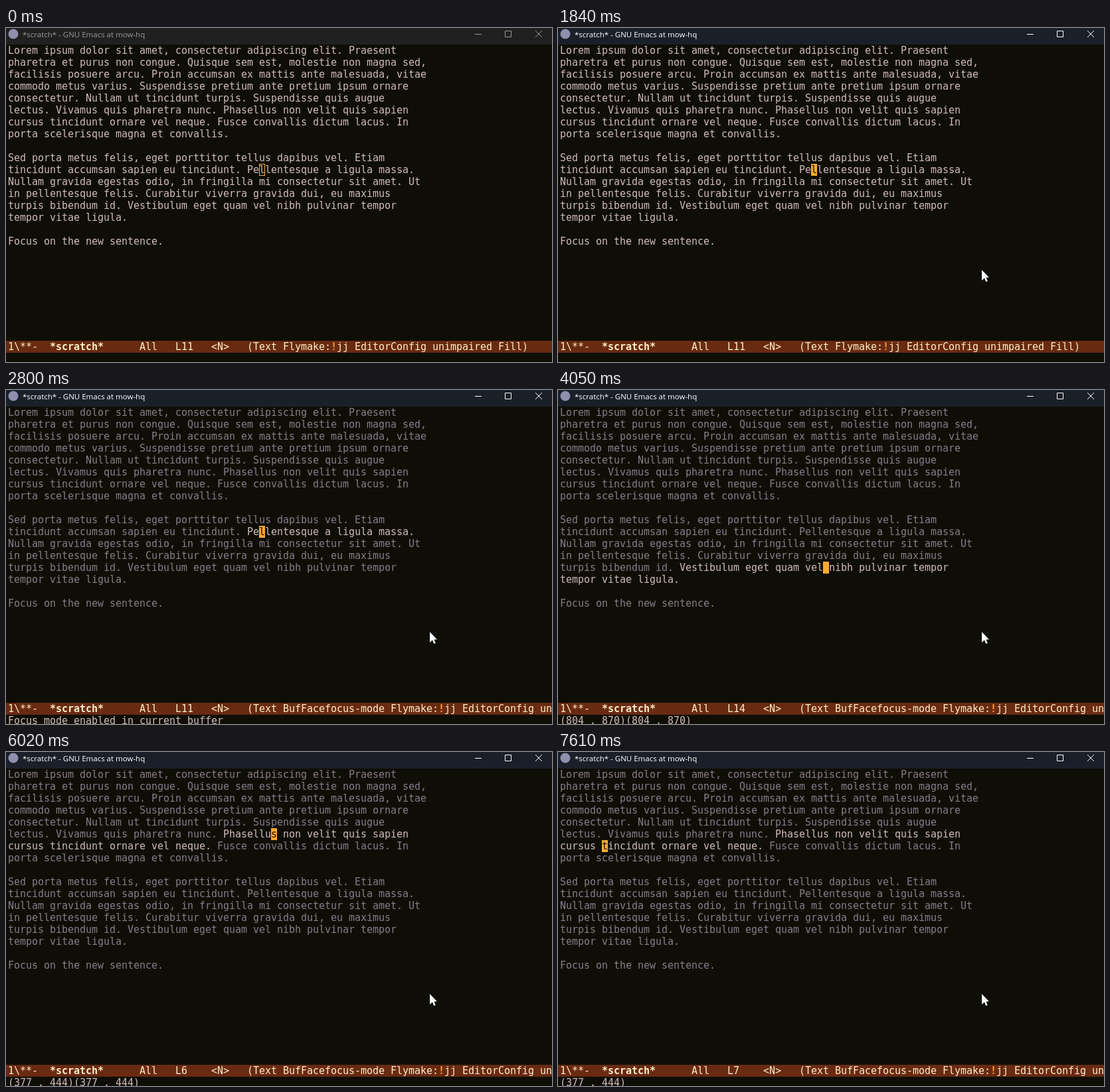
Animation of 822 by 504 pixels, one loop 8000 ms. Source, as an HTML page with a canvas:

```html
<!DOCTYPE html>
<html lang="la">
<head>
<meta charset="utf-8">
<title>Focus mode</title>
<style>
  html, body { margin: 0; width: 822px; height: 504px; overflow: hidden; background: #0f0e06; }
  canvas { display: block; }
</style>
</head>
<body>
<canvas id="stage" width="822" height="504"></canvas>
<script>
const ctx = document.getElementById("stage").getContext("2d");
const LOOP = 8000, CELL = 9, LINE = 18, LEFT = 3, TOP = 25, BAR = 472, ECHO = 490;
const BG = "#0f0e06", FG = "#cfbcba", DIM = "#887c8a", CURSOR = "#ffaa33";
const MODE_BG = "#692a12", MODE_FG = "#feeeca", WARN = "#ff9f3a";
const MONO = '15px "DejaVu Sans Mono", monospace';
const HOST = "mow-hq";

const text = `Lorem ipsum dolor sit amet, consectetur adipiscing elit. Praesent
pharetra et purus non congue. Quisque sem est, molestie non magna sed,
facilisis posuere arcu. Proin accumsan ex mattis ante malesuada, vitae
commodo metus varius. Suspendisse pretium ante pretium ipsum ornare
consectetur. Nullam ut tincidunt turpis. Suspendisse quis augue
lectus. Vivamus quis pharetra nunc. Phasellus non velit quis sapien
cursus tincidunt ornare vel neque. Fusce convallis dictum lacus. In
porta scelerisque magna et convallis.

Sed porta metus felis, eget porttitor tellus dapibus vel. Etiam
tincidunt accumsan sapien eu tincidunt. Pellentesque a ligula massa.
Nullam gravida egestas odio, in fringilla mi consectetur sit amet. Ut
in pellentesque felis. Curabitur viverra gravida dui, eu maximus
turpis bibendum id. Vestibulum eget quam vel nibh pulvinar tempor
tempor vitae ligula.

Focus on the new sentence.`;

const lines = text.split("\n");
const starts = [];
lines.reduce((at, line) => (starts.push(at), at + line.length + 1), 0);
const sentences = [...text.matchAll(/\S[^.]*\.(\s(?!\n))?/g)]
  .map(m => [m.index, m.index + m[0].length]);

// Times of the main events, in ms
const ENTER = 160, FOCUS = 840, REST = 1110, PROMPT = 2240, RUN = 2730, FOCUS_MODE = 2800;

// [time, row, column, end of paragraph]
const moves = [
  [0, 10, 42], [3200, 10, 43], [3360, 10, 44], [3590, 11, 44], [3850, 12, 44],
  [4050, 13, 44], [4680, 12, 44], [4810, 11, 44], [5140, 10, 44], [5310, 9, 44],
  [5510, 8, 0], [5680, 7, 36, true], [5850, 6, 44], [6020, 5, 44], [6220, 4, 44],
  [6360, 3, 44], [6560, 3, 0], [6660, 4, 0], [7150, 5, 0], [7310, 6, 0], [7610, 6, 7]
];
const blinks = [[1340, 1840], [4550, 4680]];

const within = (t, a, b) => t >= a && t < b;
const clamp = v => Math.max(0, Math.min(1, v));

function rect(x, y, w, h, color) {
  ctx.fillStyle = color;
  ctx.fillRect(x, y, w, h);
}

// Writes on the character grid; y is the top of the row
function write(s, col, y, color, bold) {
  ctx.font = (bold ? "bold " : "") + MONO;
  ctx.fillStyle = color;
  [...s].forEach((ch, i) => {
    if (ch !== " ") ctx.fillText(ch, LEFT + (col + i) * CELL, y + 14);
  });
}

function titleBar(title, bg, fg) {
  rect(0, 0, 822, TOP, bg);
  ctx.fillStyle = "#8f8fae";
  ctx.beginPath();
  ctx.arc(11, 9, 7.5, 0, 7);
  ctx.fill();
  ctx.font = '11.5px "Open Sans", sans-serif';
  ctx.fillStyle = ctx.strokeStyle = fg;
  ctx.fillText(`${title} - GNU Emacs at ${HOST}`, 25, 14);
  ctx.lineWidth = 1;
  ctx.beginPath();
  ctx.moveTo(706, 9.5);
  ctx.lineTo(716, 9.5);
  ctx.rect(751.5, 4.5, 9, 9);
  ctx.moveTo(797, 4);
  ctx.lineTo(807, 14);
  ctx.moveTo(807, 4);
  ctx.lineTo(797, 14);
  ctx.stroke();
}

function modeLine(row, focused) {
  rect(0, BAR, 822, LINE, MODE_BG);
  const modes = "(Text " + (focused ? "BufFacefocus-mode " : "") + "Flymake:";
  const end = 40 + modes.length;
  write("1\\**-", 0, BAR, MODE_FG);
  write("*scratch*", 7, BAR, MODE_FG, true);
  write("All   " + ("L" + (row + 1)).padEnd(6) + "<N>", 22, BAR, MODE_FG);
  write(modes, 40, BAR, MODE_FG);
  write("!", end, BAR, WARN, true);
  write("jj EditorConfig unimpaired Fill)", end + 1, BAR, MODE_FG);
}

function pointer(t) {
  const left = (1 - clamp((t - ENTER) / (REST - ENTER))) ** 3;
  const x = 638 + 158 * left, y = 365 + 107 * left;
  const shape = [[0, 0], [0, 16], [4, 12.5], [6.3, 18], [8.8, 17], [6.5, 11.6], [11, 11.6]];
  ctx.beginPath();
  shape.forEach(([dx, dy]) => ctx.lineTo(x + dx, y + dy));
  ctx.closePath();
  ctx.strokeStyle = "#000";
  ctx.lineWidth = 1;
  ctx.stroke();
  ctx.fillStyle = "#fff";
  ctx.fill();
}

function draw(t) {
  const [, row, col, paragraphEnd] = moves.findLast(m => m[0] <= t);
  const at = starts[row] + col;
  const [from, to] = paragraphEnd ? [513, 515] : sentences.find(s => s[1] > at);
  const focused = t >= FOCUS_MODE, prompting = within(t, PROMPT, RUN);

  rect(0, 0, 822, 504, BG);
  titleBar("*scratch*", "#202020", "#999");
  ctx.globalAlpha = clamp((t - FOCUS) / 160);
  titleBar(prompting ? "*Minibuf-1*" : "*scratch*", "#1a202a", "#fff");
  ctx.globalAlpha = 1;

  lines.forEach((line, r) => {
    const y = TOP + r * LINE;
    if (!focused) return write(line, 0, y, FG);
    const a = Math.max(0, Math.min(line.length, from - starts[r]));
    const b = Math.max(0, Math.min(line.length, to - starts[r]));
    write(line.slice(0, a), 0, y, DIM);
    write(line.slice(a, b), a, y, FG);
    write(line.slice(b), b, y, DIM);
  });

  const x = LEFT + col * CELL, y = TOP + row * LINE;
  if (t < FOCUS || prompting) {
    ctx.strokeStyle = CURSOR;
    ctx.lineWidth = 1;
    ctx.strokeRect(x + 0.5, y + 0.5, CELL - 1, LINE - 1);
  } else if (!blinks.some(b => within(t, ...b))) {
    rect(x, y, CELL, LINE, CURSOR);
    write(lines[row][col] || " ", col, y, BG);
  }

  modeLine(row, focused);
  if (prompting) {
    write("M-x ", 0, ECHO, FG);
    rect(LEFT + 4 * CELL, ECHO, CELL, LINE, CURSOR);
  } else if (t >= 3200) {
    const bounds = `(${from + 1} . ${to + 1})`;
    write(within(t, 3360, 7610) ? bounds + bounds : bounds, 0, ECHO, FG);
  } else if (focused) {
    write("Focus mode enabled in current buffer", 0, ECHO, FG);
  }
  if (t >= ENTER) pointer(t);
}

function tick() {
  draw(performance.now() % LOOP);
  requestAnimationFrame(tick);
}
tick();
</script>
</body>
</html>
```
